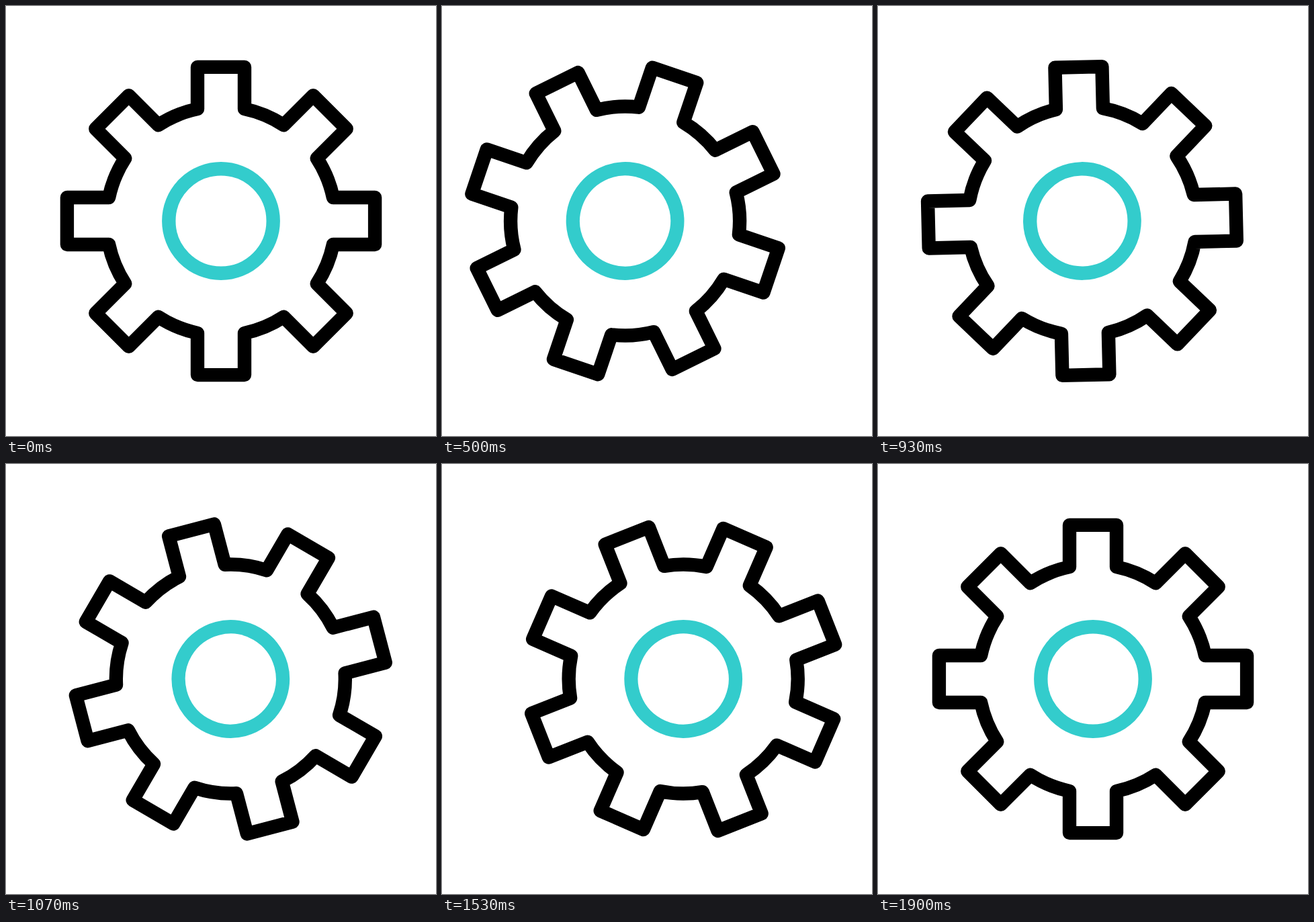
These frames come from a looping animation (640 px wide and 640 px high, 2000 ms). An HTML page:

```html
<!DOCTYPE html>
<html lang="en">
<head>
<meta charset="utf-8">
<title>Rolling gear</title>
<style>
  html, body { margin: 0; width: 100%; height: 100%; overflow: hidden; background: #fff; }
  svg { display: block; width: 100vw; height: 100vh; }
</style>
</head>
<body>
<svg viewBox="0 0 640 640">
  <g id="gear" fill="none" stroke-width="20.4" stroke-linejoin="round">
    <path id="rim" stroke="#000"/>
    <circle r="77.7" stroke="#33cccc"/>
  </g>
</svg>
<script>
const LOOP = 2000, FPS = 30, END = 57;
const TEETH = 8, RIM = 170.5, TIP = 229.1, HALF = 35;
const SWAY = 51, SPIN = 180;

// Solves cubic-bezier(a, 0, b, 1) for progress p
function ease(p, a, b) {
  let lo = 0, hi = 1, s = p;
  for (let i = 0; i < 24; i++) {
    const u = 1 - s;
    if (3 * u * u * s * a + 3 * u * s * s * b + s * s * s < p) lo = s; else hi = s;
    s = (lo + hi) / 2;
  }
  return s * s * (3 - 2 * s);
}

function between(n, from, to, a, b) {
  return ease(Math.min(1, Math.max(0, (n - from) / (to - from))), a, b);
}

// Centre, out to the left, across to the right, back to the centre
const sway = n => SWAY * (2 * between(n, 18, 41, 0.467, 0.608)
  - between(n, 0, 18, 0.25, 0.67) - between(n, 41, END, 0.333, 0.667));
const spin = n => SPIN * (2 * between(n, 19, 44, 0.19, 0.693)
  - between(n, 0, 19, 0.27, 0.655) - between(n, 44, END, 0.18, 0.66));

function gearPath() {
  const base = Math.sqrt(RIM * RIM - HALF * HALF);
  const tooth = [[-HALF, -base], [-HALF, -TIP], [HALF, -TIP], [HALF, -base]];
  const arc = `A${RIM} ${RIM} 0 0 1 `;
  let d = '';
  for (let k = 0; k < TEETH; k++) {
    const angle = k * 2 * Math.PI / TEETH, c = Math.cos(angle), s = Math.sin(angle);
    const points = tooth.map(([x, y]) => `${(x * c - y * s).toFixed(2)} ${(x * s + y * c).toFixed(2)}`);
    d += (k ? arc : 'M') + points.join('L');
  }
  return `${d}${arc}${-HALF} ${-base.toFixed(2)}Z`;
}

const gear = document.getElementById('gear');
document.getElementById('rim').setAttribute('d', gearPath());

function draw(time) {
  // Steps start on times rounded to 10 ms
  const n = Math.min(END, Math.floor((time % LOOP + 4) * FPS / 1000));
  gear.setAttribute('transform',
    `translate(${(320 + sway(n)).toFixed(2)} 320) rotate(${spin(n).toFixed(2)})`);
}

const start = performance.now();
function tick() {
  draw(performance.now() - start);
  requestAnimationFrame(tick);
}
draw(0);
requestAnimationFrame(tick);
</script>
</body>
</html>
```
